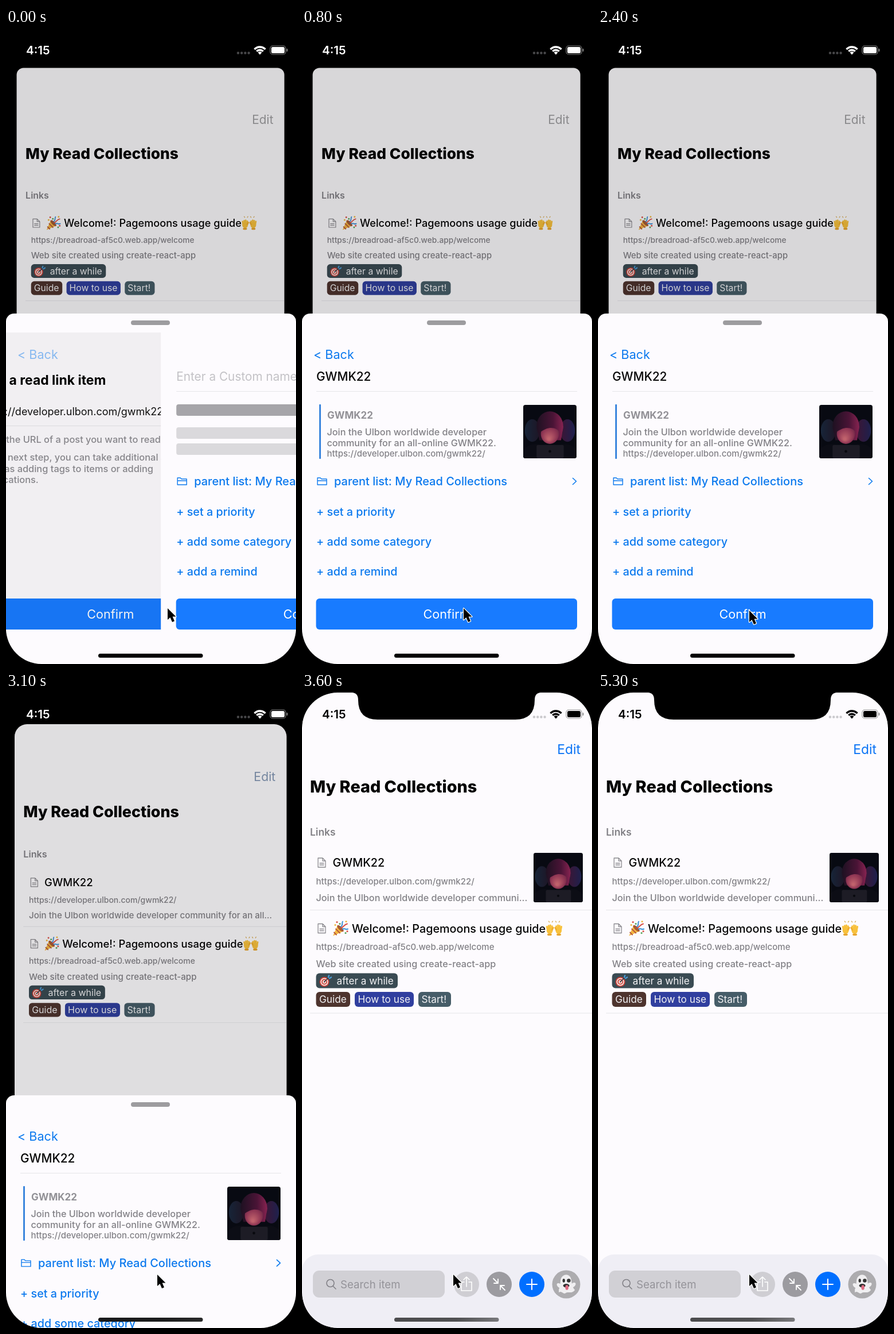
Recreate the animation shown at these times as an HTML page with a canvas. Size 506 by 1107 pixels, loop 5400 ms.

```html
<!DOCTYPE html>
<html lang="en">
<head>
<meta charset="utf-8">
<title>Read collections</title>
<style>
html, body { margin: 0; width: 100%; height: 100%; overflow: hidden; background: #000; }
canvas { display: block; width: 506px; height: 1107px; }
</style>
</head>
<body>
<canvas id="stage" width="506" height="1107"></canvas>
<script>
const W = 506, H = 1107, LOOP = 5400, STEP = 100;
const ctx = document.getElementById('stage').getContext('2d');
const PAPER = '#fdfbfe', BLUE = '#0b79ee', BUTTON = '#187bff', GRAY = '#828186', LINE = '#e6e5e9';
const EVENT = 'GWMK22', SITE = 'https://developer.ulbon.com/gwmk22/';

const clamp = v => Math.min(1, Math.max(0, v));
const mix = (a, b, k) => a + (b - a) * k;
const mixColor = (a, b, k) => `rgb(${a.map((v, i) => Math.round(mix(v, b[i], k))).join()})`;
const smooth = k => k * k * (3 - 2 * k);

// Critically damped spring, time in ms.
function spring(ms) {
  const x = Math.max(0, ms) * 0.013;
  return 1 - (1 + x) * Math.exp(-x);
}

function box(x, y, w, h, r, color) {
  ctx.fillStyle = color;
  ctx.beginPath();
  ctx.roundRect(x, y, w, h, r);
  ctx.fill();
}

function disc(x, y, r, color) {
  ctx.fillStyle = color;
  ctx.beginPath();
  ctx.arc(x, y, r, 0, 7);
  ctx.fill();
}

function oval(x, y, rx, ry, color, turn = 0) {
  ctx.fillStyle = color;
  ctx.beginPath();
  ctx.ellipse(x, y, rx, ry, turn, 0, 7);
  ctx.fill();
}

function stroke(d, color, width) {
  ctx.strokeStyle = color;
  ctx.lineWidth = width;
  ctx.lineCap = ctx.lineJoin = 'round';
  ctx.stroke(new Path2D(d));
}

function fill(d, color) {
  ctx.fillStyle = color;
  ctx.fill(new Path2D(d));
}

// y is the middle of the capital letters.
function text(str, x, y, size, color, weight = 500, align = 'left') {
  ctx.font = `${weight} ${size}px Inter, sans-serif`;
  ctx.fillStyle = color;
  ctx.textAlign = align;
  ctx.fillText(str, x, y + size * 0.36);
}

function at(x, y, scale, draw) {
  ctx.save();
  ctx.translate(x, y);
  ctx.scale(scale, scale);
  draw();
  ctx.restore();
}

function popper() {
  fill('M-5-5 L5 5 L-13 13 Z', '#f4b73f');
  stroke('M-8 1 L-1 8 M-11 7 L-7 11', '#b85b3e', 2);
  oval(0, 0, 7.5, 3, '#a65a35', Math.PI / 4);
  stroke('M1-3 C5-6 2-9 4-12 M4 1 C8-1 9 3 13 1', '#3f92d8', 2);
  stroke('M2-1 C6-3 7-7 12-8', '#d9534a', 2);
  [[-6, -11, '#d9534a'], [-1, -8, '#58a65c'], [10, -12, '#efb73e'],
   [9, 8, '#58a65c'], [12, 5, '#d9534a'], [-9, -6, '#efb73e']].forEach(d => disc(d[0], d[1], 1.6, d[2]));
}

function hands() {
  for (const side of [-1, 1]) {
    ctx.save();
    ctx.scale(side, 1);
    for (let i = 0; i < 4; i++) stroke(`M${4 + i * 1.8} 3 L${3 + i * 2.5} ${-5 + Math.abs(i - 1.3) * 1.5}`, '#f8c13c', 2.5);
    oval(6.5, 3, 4.5, 5, '#f8c13c');
    stroke('M3 2 L1.5-1', '#eeae30', 2.4);
    stroke('M5 9 L8.5 9', '#e8a52c', 3);
    stroke('M3-9 L2-10.5 M7-9 L8-10.5', '#d4a64a', 1);
    ctx.restore();
  }
}

function target() {
  ['#cf3f36', '#f0e9e5', '#cf3f36', '#f0e9e5', '#cf3f36'].forEach((c, i) => disc(-2, 2, 8.5 - i * 1.8, c));
  stroke('M-2 2 L7-7', '#2f3943', 1.6);
  stroke('M5-6 L6-9 M7-4 L10-6', '#4b9bd5', 2.4);
}

function ghost() {
  fill('M-11 9 C-8 4-9-3-8-7 C-5-17 7-17 9-7 C10-2 10 5 15 10 C10 17 4 12 0 15 C-4 18-6 10-11 14 Z', '#f0eff1');
  oval(-10, 3, 5, 3, '#f0eff1', 0.7);
  oval(12, 2, 5, 3, '#f0eff1', -0.7);
  oval(-3, -5, 2, 3, '#333');
  disc(5, -5, 3, '#333');
  oval(1, 3, 5, 3, '#333');
  oval(2, 6, 2.5, 4, '#df6b83');
}

// Poster of three faceless figures behind a laptop, in a 100 x 100 space.
function poster(x, y, size) {
  at(x, y, size / 100, () => {
    ctx.beginPath();
    ctx.roundRect(0, 0, 100, 100, 4);
    ctx.clip();
    box(0, 0, 100, 100, 0, '#080a12');
    const side = ctx.createLinearGradient(0, 0, 100, 0);
    side.addColorStop(0, '#16263a');
    side.addColorStop(0.3, '#1d1626');
    side.addColorStop(0.72, '#3a1636');
    side.addColorStop(1, '#1a2250');
    oval(17, 48, 14, 21, side);
    oval(83, 48, 14, 21, side);
    const hair = ctx.createLinearGradient(26, 0, 76, 0);
    hair.addColorStop(0, '#1f1122');
    hair.addColorStop(0.6, '#4a1436');
    hair.addColorStop(1, '#8a2452');
    oval(50, 40, 25, 28, hair);
    fill('M26 40 L75 40 L71 66 L30 66 Z', hair);
    const skin = ctx.createRadialGradient(48, 64, 2, 50, 54, 22);
    skin.addColorStop(0, '#c0626c');
    skin.addColorStop(0.6, '#8e3553');
    skin.addColorStop(1, '#58203f');
    oval(50, 54, 17, 19, skin);
    fill('M31 52 C34 24 66 24 70 52 C62 42 48 38 31 52', hair);
    fill('M0 100 V84 Q16 68 34 76 H67 Q86 68 100 84 V100 Z', '#0c0d15');
    box(25, 75, 51, 25, 3, '#1d1c25');
    disc(50, 87, 2.5, '#08090e');
  });
}

function page(x, y) {
  stroke(`M${x} ${y - 8} h8 l5 5 v11 h-13 z M${x + 8} ${y - 8} v5 h5 M${x + 3} ${y + 1} h7 M${x + 3} ${y + 4} h7`, '#8b8a8f', 1.3);
}

function tag(x, y, w, label, color, pad = 5.5) {
  box(x, y - 13, w, 26, 6, color);
  text(label, x + pad, y, 17.2, '#f2f2f4', 400);
}

function rule(x, y, w) { box(x, y, w, 1, 0, LINE); }

function welcomeRow(y) {
  page(28, y);
  at(67, y, 1, popper);
  text('Welcome!: Pagemoons usage guide', 87, y, 19.8, '#050505');
  at(440, y, 1.2, hands);
  text('https://breadroad-af5c0.web.app/welcome', 24.5, y + 32, 15, GRAY);
  text('Web site created using create-react-app', 24.5, y + 61.5, 16.2, GRAY);
  tag(24.5, y + 91, 142.5, 'after a while', '#3a4b53', 36);
  at(41, y + 91, 1, target);
  tag(24.5, y + 123.5, 59.5, 'Guide', '#4e342e');
  tag(92, y + 123.5, 103, 'How to use', '#303f9f');
  tag(203, y + 123.5, 57, 'Start!', '#465d68');
  rule(14, y + 147, 492);
}

function eventRow(withPoster) {
  page(28, 297);
  text(EVENT, 53.5, 297, 19.8, '#050505');
  text(SITE, 24.5, 329.5, 15, GRAY);
  text('Join the Ulbon worldwide developer communi' + (withPoster ? '...' : 'ty for an all...'), 24.5, 358.5, 16.2, GRAY);
  if (withPoster) poster(404, 280, 86);
  rule(14, 379, 492);
}

function toolbar() {
  box(0, 979, W, 140, [28, 28, 0, 0], '#efeef5');
  box(19, 1007, 230, 47, 11, '#d1d0d5');
  ctx.beginPath();
  ctx.arc(49.5, 1029, 6.5, 0, 7);
  ctx.strokeStyle = '#828187';
  ctx.lineWidth = 1.6;
  ctx.stroke();
  stroke('M54 1034 L59 1039', '#828187', 1.6);
  text('Search item', 67, 1031, 18.6, '#949399', 400);
  disc(287, 1031, 22, '#cfced3');
  stroke('M283 1027 h-5 v15 h18 v-15 h-5 M287 1035 v-17 M282 1023 l5-5 l5 5', '#fff', 1.6);
  disc(344, 1031, 22, '#9c9ba0');
  stroke('M334 1021 l8 8 M342 1022 v7 h-7 M354 1041 l-8-8 M346 1040 v-7 h7', '#fff', 1.8);
  disc(401, 1031, 22, '#006fff');
  stroke('M392 1031 h18 M401 1022 v18', '#fff', 2);
  disc(461, 1031, 24.5, '#adacaf');
  at(460, 1030, 1.08, ghost);
}

// open: 0 while it is a receded card, 1 when it fills the screen.
function collection(open, time) {
  const back = 1 - open, added = time >= 2700;
  ctx.save();
  ctx.beginPath();
  ctx.roundRect(18.6 * back, 69.5 * back, W - 39 * back, H, mix(12, 62, open));
  ctx.clip();
  box(0, 0, W, H, 0, PAPER);
  at(21.3 * back, 67.6 * back, 1 - 0.084 * back, () => {
    text('Edit', 486, 100, 22.8, mixColor([160, 160, 163], [10, 115, 245], open), 400, 'right');
    text('My Read Collections', 14, 165, 28.8, '#000', 800);
    text('Links', 14, 244, 17.4, GRAY, 600);
    if (added) eventRow(time >= 3500);
    welcomeRow(added ? 411.5 : 297);
    toolbar();
  });
  box(0, 0, W, H, 0, `rgba(0,0,0,${0.145 * back})`);
  ctx.restore();
}

function confirmButton() {
  box(24.5, 993, 455.5, 54, 6, BUTTON);
  text('Confirm', 252.5, 1020, 21.6, '#fff', 400, 'center');
}

function linkForm(dim) {
  box(0, 530, W, 517, 0, PAPER);
  text('Add a read link item', 25, 613, 22.9, '#000', 700);
  text(SITE, 25, 668, 18, '#111', 400);
  rule(25, 692, 455);
  ['Enter the URL of a post you want to read later.', 'In the next step, you can take additional actions',
   'such as adding tags to items or adding', 'notifications.']
    .forEach((s, i) => text(s, 25, [716.5, 747.5, 767, 786][i], 16.4, '#8d8c91'));
  confirmButton();
  box(0, 530, W, 517, 0, `rgba(0,0,0,${dim})`);
}

function itemForm(loaded) {
  text(loaded ? EVENT : 'Enter a Custom name', 25, 607, 20.8, loaded ? '#050505' : '#c3c2c6', loaded ? 500 : 400);
  rule(25, 632, 455);
  if (loaded) {
    box(30, 655, 3, 95, 1, '#3b86dd');
    text(EVENT, 44, 674, 17, '#929196', 700);
    text('Join the Ulbon worldwide developer', 43.5, 703.5, 16.2, GRAY);
    text('community for an all-online ' + EVENT + '.', 43.5, 722.5, 16.2, GRAY);
    text(SITE, 43.5, 741, 15, GRAY);
    poster(386, 656, 93);
  } else {
    box(25, 655, 455, 20, 4, '#a6a5a9');
    box(25, 695, 455, 20, 4, '#dad9dc');
    box(25, 723, 455, 20, 4, '#dad9dc');
  }
  stroke('M27 783 h5 l2 2 h9 v10 h-16 z M27 788 h16', BLUE, 1.4);
  text('parent list: My Read Collections', 56, 789, 20, BLUE);
  stroke('M472.5 783.5 l6 5.5 l-6 5.5', BLUE, 1.6);
  text('+ set a priority', 25, 842, 19.8, BLUE);
  text('+ add some category', 25, 894, 19.8, BLUE);
  text('+ add a remind', 25, 945.5, 19.8, BLUE);
  confirmButton();
}

function sheet(drop, time) {
  const push = time >= 600 ? 1 : spring(time + 120), edge = W * (1 - push);
  ctx.save();
  ctx.translate(0, 610 * drop);
  box(0, 497, W, 700, [14, 14, 0, 0], PAPER);
  if (push < 1) {
    ctx.save();
    ctx.beginPath();
    ctx.rect(0, 497, edge - 2, 700);
    ctx.clip();
    ctx.translate(-152 * push, 0);
    linkForm(0.1 * push);
    ctx.restore();
  }
  ctx.save();
  ctx.translate(edge, 0);
  itemForm(time >= 600);
  ctx.restore();
  ctx.globalAlpha = push;
  text('< Back', 20, 568, 21.6, BLUE, 400);
  ctx.globalAlpha = 1;
  box(218, 509, 68, 8, 4, '#9d9c9f');
  ctx.restore();
}

function bezel() {
  const frame = new Path2D();
  frame.rect(0, 0, W, H);
  frame.roundRect(0, 1, W, H - 1, 62);
  ctx.fillStyle = '#000';
  ctx.fill(frame, 'evenodd');
  fill('M88 0 V1 Q98 2 98 14 Q98 48 132 48 H372 Q406 48 406 14 Q406 2 416 1 V0 Z', '#000');
}

function statusBar(open) {
  const k = smooth(clamp((open - 0.4) / 0.4));
  const ink = mixColor([255, 255, 255], [0, 0, 0], k);
  text('4:15', 35, 39, 20.6, ink, 600);
  for (let i = 0; i < 4; i++) disc(405 + i * 6.2, 43.5, 2.2, mixColor([72, 72, 74], [202, 201, 205], k));
  ctx.strokeStyle = ink;
  ctx.lineCap = 'butt';
  ctx.lineWidth = 3.4;
  for (const r of [13, 7.8]) {
    ctx.beginPath();
    ctx.arc(443, 46, r, -Math.PI * 0.76, -Math.PI * 0.24);
    ctx.stroke();
  }
  fill('M443 46.5 L439.5 42.5 Q443 39.5 446.5 42.5 Z', ink);
  ctx.lineWidth = 1.2;
  ctx.strokeStyle = mixColor([130, 130, 130], [150, 150, 150], k);
  ctx.beginPath();
  ctx.roundRect(461, 31, 27, 15, 4.5);
  ctx.stroke();
  box(463, 33, 23, 11, 2.5, ink);
  box(489.5, 36, 2, 5, 1, ctx.strokeStyle);
}

function pointer(time) {
  const k = smooth(clamp((time - 1900) / 400));
  at(mix(282, 264, k), mix(1010, 1014, k), 1, () => {
    const arrow = 'M0 0 V20 L4.5 16 L8 24 L12 22.3 L8.6 14.5 H14.5 Z';
    stroke(arrow, '#fff', 2.4);
    fill(arrow, '#000');
  });
}

function draw(time) {
  const done = time >= 3600;
  const drop = done ? 1 : spring(time - 3008);
  const open = done ? 1 : spring(time - 3038);
  box(0, 0, W, H, 0, '#000');
  collection(open, time);
  if (!done) sheet(drop, time);
  bezel();
  statusBar(open);
  const bar = ctx.createLinearGradient(161, 0, 343, 0);
  bar.addColorStop(0, mixColor([0, 0, 0], [75, 75, 77], drop));
  bar.addColorStop(0.6, mixColor([0, 0, 0], [80, 80, 82], drop));
  bar.addColorStop(1, mixColor([0, 0, 0], [120, 120, 123], drop));
  box(161, 1089, 182.5, 7, 3.5, bar);
  pointer(time);
}

function tick() {
  const time = performance.now() % LOOP;
  draw(Math.floor(time / STEP) * STEP);
  requestAnimationFrame(tick);
}
tick();
</script>
</body>
</html>
```
